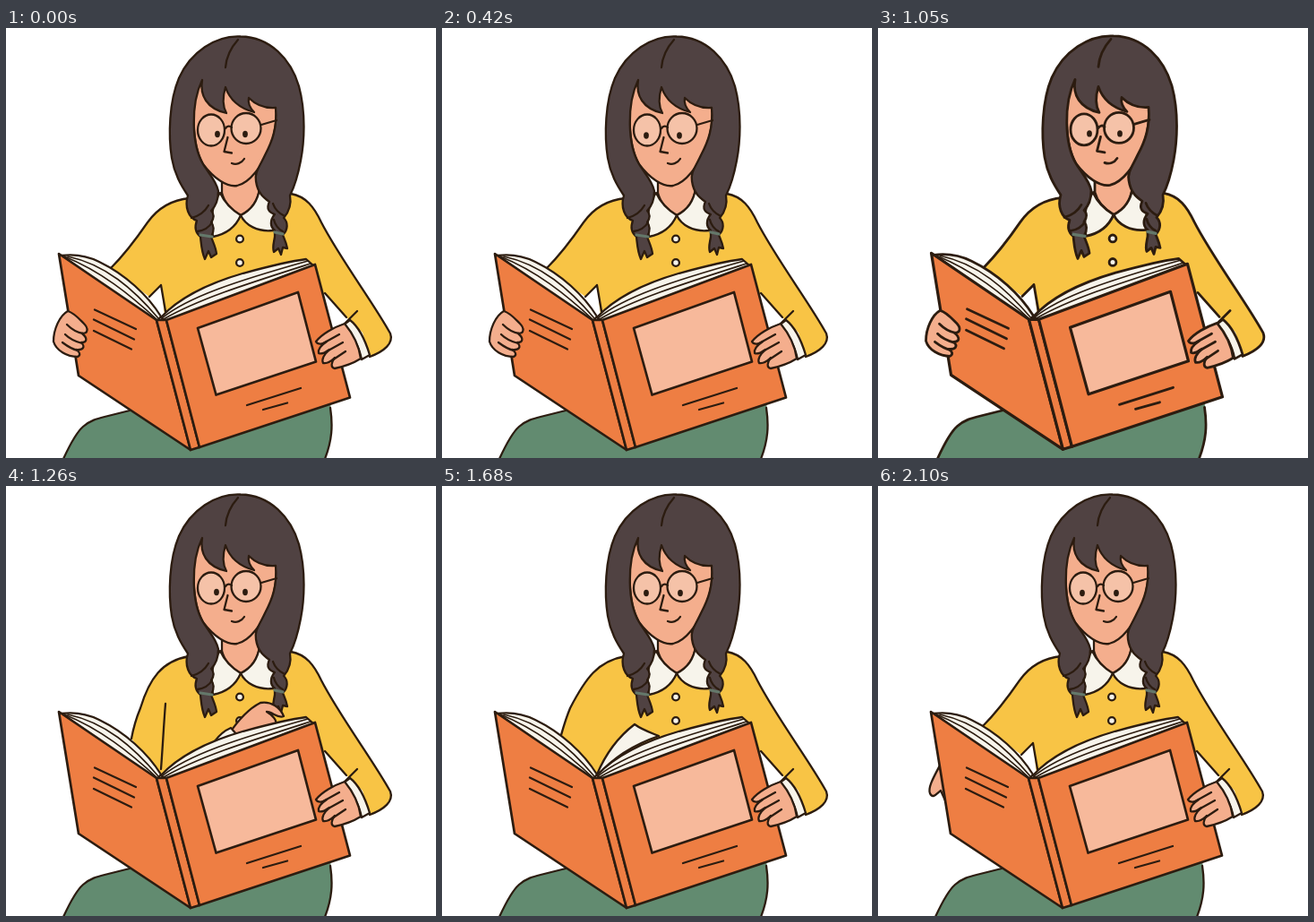
Animation, 480 px wide and 480 px high, one loop 2310 ms. Source, as an HTML page:

```html
<!DOCTYPE html>
<html lang="en">
<head>
<meta charset="utf-8">
<title>Reading</title>
<style>
  html, body { margin: 0; width: 100%; height: 100%; overflow: hidden; background: #fff; }
  svg { display: block; width: 100%; height: 100%; --line: 2.3px; }
  svg * { stroke-linecap: round; stroke-linejoin: round; }
  path, circle, ellipse { stroke: #2c1c10; stroke-width: var(--line); fill: none; }
  .plain { stroke: none; }
  .skin { fill: #f4ae8d; }
  .lens { fill: #f5c2a8; }
  .hair { fill: #504242; }
  .yellow { fill: #f8c445; }
  .paper { fill: #f7f4eb; }
  .orange { fill: #ee7e43; }
  .green { fill: #628b70; }
  .label { fill: #f7b99b; }
  .bold { stroke-width: calc(var(--line) + .4px); }
  .fine { stroke-width: 1.6px; }
  .tie { stroke: #64786a; stroke-width: 3.2px; }
  .pupil { fill: #2c1c10; stroke: none; }
</style>
</head>
<body>
<svg id="stage" viewBox="0 0 480 480">
  <g id="leg">
    <path class="green plain" d="M64 481C70 468 78 452 86 445C94 438 102 436 110 434L138 427L362 418C365 442 364 460 356 481Z"/>
    <path d="M64 481C70 468 78 452 86 445C94 438 102 436 110 434L138 427M362 424C365 444 364 460 356 481"/>
  </g>

  <g id="figure">
    <!-- torso and right sleeve -->
    <path class="yellow plain" d="M205 190L318 185C335 188 344 200 352 217C372 256 411 308 429 341C433 352 422 361 406 368L398 340L380 323L356 296L330 330H178L173 287L178 243Z"/>
    <path d="M318 185C335 188 344 200 352 217C372 256 411 308 429 341C433 352 422 361 406 367M356 296L380 323M392 316L378 330"/>
    <path class="paper" d="M384 326C393 333 400 345 406 365L397 370C394 355 388 343 376 332Z"/>
    <path id="sleeve" class="yellow plain"/>
    <path id="sleeveLine"/>
    <path id="underarm" d="M173 287L160 300M173 287L178 316"/>
    <path id="fold" d="M178 243C176 268 175 290 173 316"/>
    <circle class="paper" cx="261" cy="235.5" r="3.9"/>
    <circle class="paper" cx="261" cy="262" r="3.9"/>

    <!-- neck and collar -->
    <path class="skin" d="M241 165V184C244 196 253 204 262 209C273 204 281 194 283 180L278 160Z"/>
    <path class="paper" d="M239 184C231 194 228 210 231 233C246 230 257 221 262 209C252 203 244 195 239 184Z"/>
    <path class="paper" d="M283 179C281 194 274 203 262 209C267 220 281 228 298 226L300 190Z"/>

    <!-- face -->
    <path class="skin" d="M215 56C207 85 207 130 220 152C232 168 247 178 258 176C272 173 287 153 295 132C302 113 304 90 299 65Z"/>

    <!-- hair and braids -->
    <path class="hair" d="M262 9.5C234 8 206 27 193 56C182 82 181 120 185 145C188 163 195 175 203 187C199 200 204 212 213 215C210 223 212 229 217 233C218 241 218 249 222 258L226 249L229 256L235 252C234 244 231 239 229 233C233 226 232 220 229 217C233 211 232 207 229 204C234 199 237 192 237 182C235 171 226 162 220 152C207 130 206 85 219 58C216 75 224 90 246 95C241 86 242 76 245 66C250 81 262 90 277 94C272 89 270 83 271 78C279 86 289 90 301 89C303 111 297 127 289 142C283 155 277 162 279 171C281 184 287 189 294 194C290 202 294 206 300 208C294 215 295 222 300 226L300 233C299 240 297 245 299 250L304 246L307 253L309 245L314 246C313 240 311 236 309 231C315 225 315 217 310 212C316 205 319 198 317 187C322 177 326 164 329 148C333 127 335 95 327 65C318 35 295 10 262 9.5Z"/>
    <path d="M259 13C251 22 246 31 245 44M207 212C215 210 222 205 226 198M214 227C221 226 227 222 230 217M311 210C305 207 300 202 298 196M309 227C304 225 300 219 299 214"/>
    <path class="tie" d="M217 231L230 233M300 228L309 230"/>

    <!-- features -->
    <ellipse class="lens" cx="229" cy="114" rx="15" ry="17.5"/>
    <ellipse class="lens" cx="268" cy="112" rx="16.5" ry="17"/>
    <path d="M245 112C247 109 250 109 252 111M285 108L302 103M247.5 122L243.5 138L252 139.5M252 151C257 153 263 151 266 146"/>
    <ellipse class="pupil" id="leftPupil" rx="2.9" ry="3.7"/>
    <ellipse class="pupil" id="rightPupil" rx="2.9" ry="3.7"/>

    <g id="turningHand">
      <path class="skin" d="M248 278C258 263 270 249 284 242C296 240 306 247 310 257C303 260 298 252 291 252C298 256 303 262 301 267L264 280Z"/>
      <path class="paper" d="M233 285C238 278 244 273 251 270L258 278L246 287Z"/>
    </g>
  </g>

  <g id="book">
    <path id="peekHand" class="skin" d="M71 308C64 322 55 336 58 343C61 350 66 343 70 340L75 351L82 320Z"/>
    <path class="paper" d="M62 254C78 252 92 255 104 261C133 275 158 298 173 322L168 328Z"/>
    <path class="fine" d="M69 255C111 264 142 291 170 324M65 255C105 271 138 297 169 326"/>
    <path id="page" class="paper"/>
    <path class="paper" d="M173 323C192 302 226 285 264 274C290 267 312 261 335 258L343 265L178 327Z"/>
    <path class="fine" d="M174 324C203 300 259 282 337 260M176 325C216 302 271 285 340 263"/>
    <path class="orange bold" d="M59 252L168 326L206 471L81 388Z"/>
    <path class="orange bold" d="M168 326L179 326L216 468L206 471Z"/>
    <path class="orange bold" d="M179 326L345 264L384 412.5L216 468Z"/>
    <path class="label bold" d="M214 335L326 295L346 372.5L234.5 409.5Z"/>
    <path d="M99 314.5L145 336M98 325.5L143 347.5M98 338L140 358.5M269 421L329 402M287 426L314 418.5"/>

    <g id="leftHand">
      <path class="skin" d="M69 316C60 321 53 336 53 350C56 360 68 367 80 367C84 365 82 361 78 359C86 360 89 356 84 351C91 351 91 346 85 341C92 341 92 335 87 330C81 324 76 318 69 316Z"/>
      <path d="M86 341C79 340 73 336 68 331M85 352C77 350 70 346 66 342M80 360C72 358 67 354 63 351"/>
    </g>
    <path class="skin" d="M378 330C366 334 352 342 346 350C348 354 354 353 358 350C352 354 348 359 349 363C353 365 358 361 361 359C355 364 352 370 354 374C359 375 364 371 367 368C363 373 362 379 367 380C377 378 388 374 396 369C394 354 388 342 378 330Z"/>
    <path d="M354 352L372 342M358 361L376 351M364 371L379 361"/>
  </g>
</svg>
<script>
const STEP = 210, COUNT = 11;
const $ = id => document.getElementById(id);
const show = (id, on) => $(id).style.display = on ? "" : "none";
const place = (id, x, y) => $(id).setAttribute("transform", `translate(${x} ${y})`);

// Pupil positions: left x, right x, y
const gaze = [
  [236, 267, 118.5], [236, 270, 118.5], [228, 265, 120], [230, 267, 121],
  [235, 267, 119.5], [236, 270, 118.5], [235, 267, 118.5], [231, 266, 119],
  [228, 266, 119.5], [228, 265, 119.5], [228, 266, 119.5]
];

// Where the left sleeve meets the book while the page is turned
const elbow = { 6: [140, 282], 7: [138, 280], 8: [133, 278], 9: [126, 273] };

const pages = {
  7: "M173 322C187 288 218 263 255 249C266 257 277 261 289 265C245 277 205 294 174 324Z",
  8: "M173 322C183 298 198 279 215 266C223 272 232 275 242 279C213 289 190 304 174 323Z",
  9: "M173 322C162 293 148 273 128 260L105 263C135 276 157 298 172 323Z"
};

function draw(step) {
  // Two hand-drawn looks take turns: the second is shifted and inked heavier
  const alternate = step % 2;
  $("stage").style.setProperty("--line", alternate ? "2.8px" : "2.3px");
  place("figure", alternate, alternate * -0.6);
  place("book", alternate * 0.5, alternate * -0.7);
  place("leg", alternate * 2.5, alternate * -0.5);

  const [x, y] = elbow[step] || [117, 268];
  const turning = step in elbow;
  const shoulder = turning
    ? `M205 190C174 195 160 215 ${x + 10} 248C${x + 5} 260 ${x + 2} 271 ${x} ${y}`
    : `M205 190C183 192 168 203 158 217C147 233 133 252 ${x} ${y}`;
  $("sleeveLine").setAttribute("d", shoulder);
  $("sleeve").setAttribute("d", shoulder + (turning
    ? "L172 322L225 300V190Z"
    : "L160 300L173 287L180 316L225 300V190Z"));
  show("underarm", !turning);
  show("fold", step === 6 || step === 7);
  show("turningHand", step === 6);
  show("leftHand", step < 6);
  show("peekHand", step === 10);
  $("page").setAttribute("d", pages[step] || "");

  const [left, right, height] = gaze[step];
  place("leftPupil", left - alternate, height);
  place("rightPupil", right - alternate, height);
}

let shown = -1;
function tick() {
  const step = Math.floor(performance.now() / STEP) % COUNT;
  if (step !== shown) draw(shown = step);
  requestAnimationFrame(tick);
}
tick();
</script>
</body>
</html>
```
